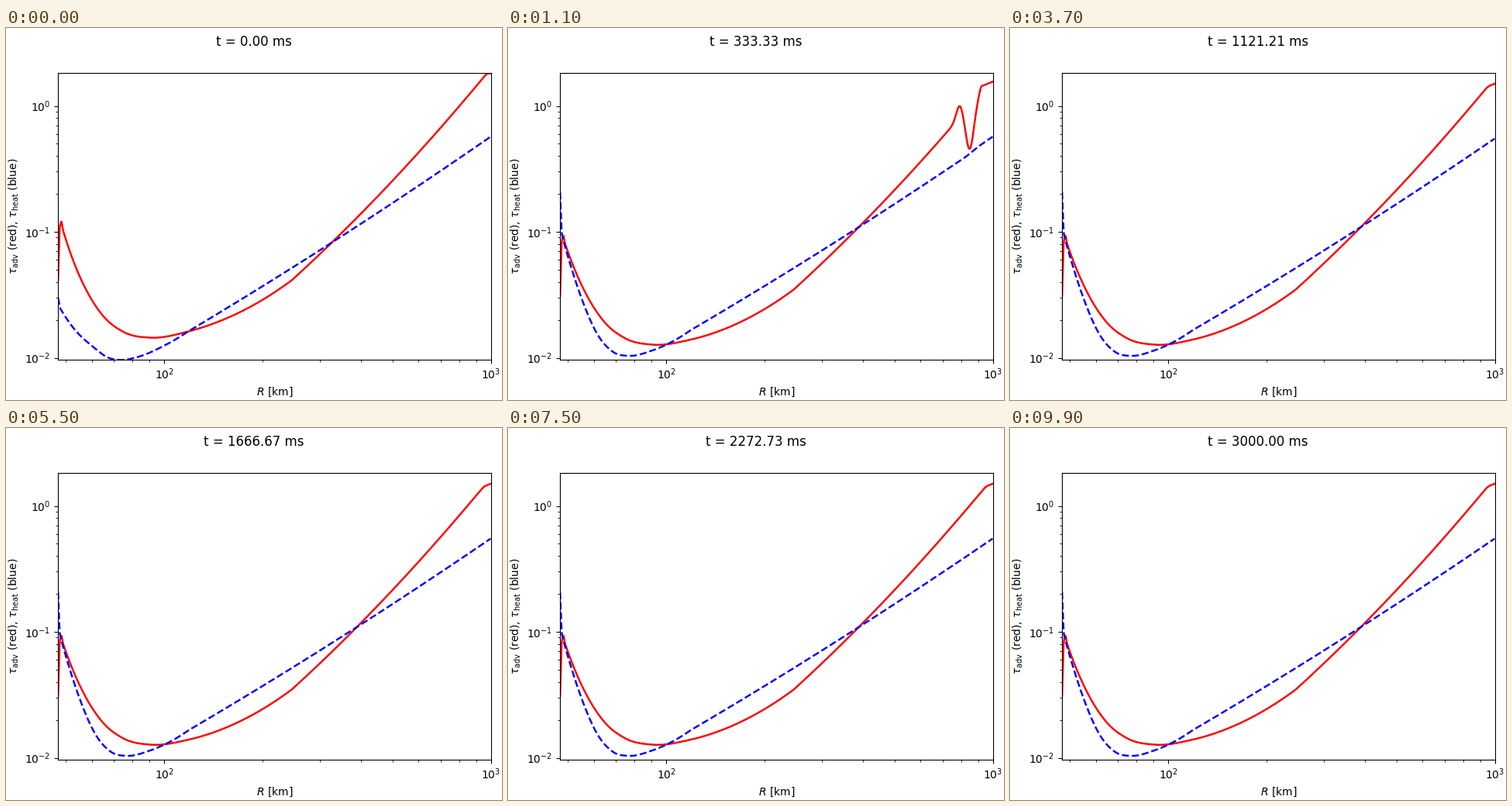
A matplotlib script for the animation above (10000 ms loop, 640 by 480 pixels).

```python
import numpy as np
import matplotlib.pyplot as plt
from matplotlib.animation import FuncAnimation

W, H, DPI = 640, 480, 100
FRAMES, T_END = 100, 3000.0
LEFT, RIGHT, TOP, BOTTOM = 67.2, 625.9, 57.6, 428.16  # axes box, stage pixels
X100, X_DEC = 204.4, 422.0                            # R = 100 km, pixels per decade
Y1, Y_DEC = 100.5, 162.5                              # tau = 1, pixels per decade


def to_r(x):
    return 10 ** (2 + (x - X100) / X_DEC)


def to_x(r):
    return X100 + X_DEC * (np.log10(r) - 2)


def to_tau(y):
    return 10 ** ((Y1 - y) / Y_DEC)


def spline(x, pts):
    """Cubic Hermite curve through a few key points."""
    px, py = np.array(pts, float).T
    m = np.gradient(py, px, edge_order=2)
    k = np.clip(np.searchsorted(px, x, side="right") - 1, 0, len(px) - 2)
    h = px[k + 1] - px[k]
    s = (x - px[k]) / h
    return ((1 + 2 * s) * (1 - s) ** 2 * py[k] + s * (1 - s) ** 2 * h * m[k]
            + s * s * (3 - 2 * s) * py[k + 1] - s * s * (1 - s) * h * m[k + 1])


def profile(x, spike, valley, outer):
    """Sharp inner spike, smooth valley, then the outer power law."""
    y = np.where(x < valley[-1][0], spline(x, valley), outer)
    corners = spike + valley[:1]
    return np.where(x < valley[0][0], np.interp(x, *zip(*corners)), y)


def smoothstep(x, a, b):
    s = np.clip((x - a) / (b - a), 0, 1)
    return s * s * (3 - 2 * s)


def bump(u, width):
    return np.exp(-(u / width) ** 2)


xs = np.append(np.arange(LEFT, RIGHT, 0.5), RIGHT)
u = xs - 369
adv_end = profile(
    xs, [(67.2, 346), (69.3, 275), (71.5, 267)],
    [(73.5, 278), (85, 309), (105, 351), (125, 380), (150, 399.7),
     (187, 408.6), (235, 402.3), (300, 379.5), (369, 337.5)],
    337.5 - 0.908 * u - 0.0006 * u ** 2)
adv_start = adv_end - 12 + 3.7 * bump(xs - 145, 90) - 8 * np.exp((72 - xs) / 18)

u = xs - 204
heat_outer = 408.5 - 0.578 * u - 0.000123 * u ** 2
heat_end = profile(
    xs, [(67.2, 212), (69.3, 265)],
    [(72, 276), (78, 297), (95, 349), (115, 394.5), (135, 417.5),
     (157, 423), (185, 416.5), (235, 390.5)],
    heat_outer)
heat_start = profile(
    xs, [(67.2, 348)],
    [(70, 362), (85, 384.5), (115, 413.5), (130, 424.5), (148, 428.3),
     (170, 424.5), (204, 410), (235, 391.7)],
    heat_outer + 1.5 - 0.0095 * u)


def state(t):
    """Both curves at time t: a wave runs outwards and leaves the settled flow."""
    front = to_x(max(48.0, 850 * (t / 333.3) ** 0.8))
    u = xs - front
    decay = np.exp(-t / 40)

    ahead = np.maximum(smoothstep(u, 8, 18), decay)
    size = np.clip((front - LEFT) / 529, 0, 1)
    adv = adv_end + (adv_start - adv_end) * ahead
    adv = adv + size * (56 * bump(u, 7.5) - 17 * bump(u + 13.5, 6))
    # the outer boundary holds the curve down near the edge
    grow = min(t / 333.3, 1)
    edge = 58.5 + 10.8 * grow + 2.6 * smoothstep(t, 600, 1100)
    adv = np.logaddexp(adv, edge + 0.4 * grow * np.minimum(RIGHT - xs, 40))

    ahead = np.maximum(smoothstep(u, -8, 14), decay)
    heat = heat_end + (heat_start - heat_end) * ahead
    return to_tau(adv), to_tau(heat)


fig = plt.figure(figsize=(W / DPI, H / DPI), dpi=DPI)
ax = fig.add_axes([LEFT / W, 1 - BOTTOM / H, (RIGHT - LEFT) / W, (BOTTOM - TOP) / H])
ax.set_xscale("log")
ax.set_yscale("log")
ax.set_xlim(to_r(LEFT), to_r(RIGHT + 0.6))
ax.set_ylim(to_tau(BOTTOM), to_tau(TOP))
ax.set_xlabel(r"$R$ [km]")
ax.set_ylabel(r"$\tau_\mathrm{adv}$ (red), $\tau_\mathrm{heat}$ (blue)")
title = fig.suptitle("", y=0.982)
adv_line, = ax.plot([], [], "r-", lw=1.75)
heat_line, = ax.plot([], [], "b--", lw=1.75)
radius = to_r(xs)


def update(i):
    t = T_END * i / (FRAMES - 1)
    adv, heat = state(t)
    adv_line.set_data(radius, adv)
    heat_line.set_data(radius, heat)
    title.set_text(f"t = {t:.2f} ms")
    return adv_line, heat_line, title


anim = FuncAnimation(fig, update, frames=FRAMES, interval=100,
                     repeat=True, repeat_delay=0, blit=False)
plt.show()
```
